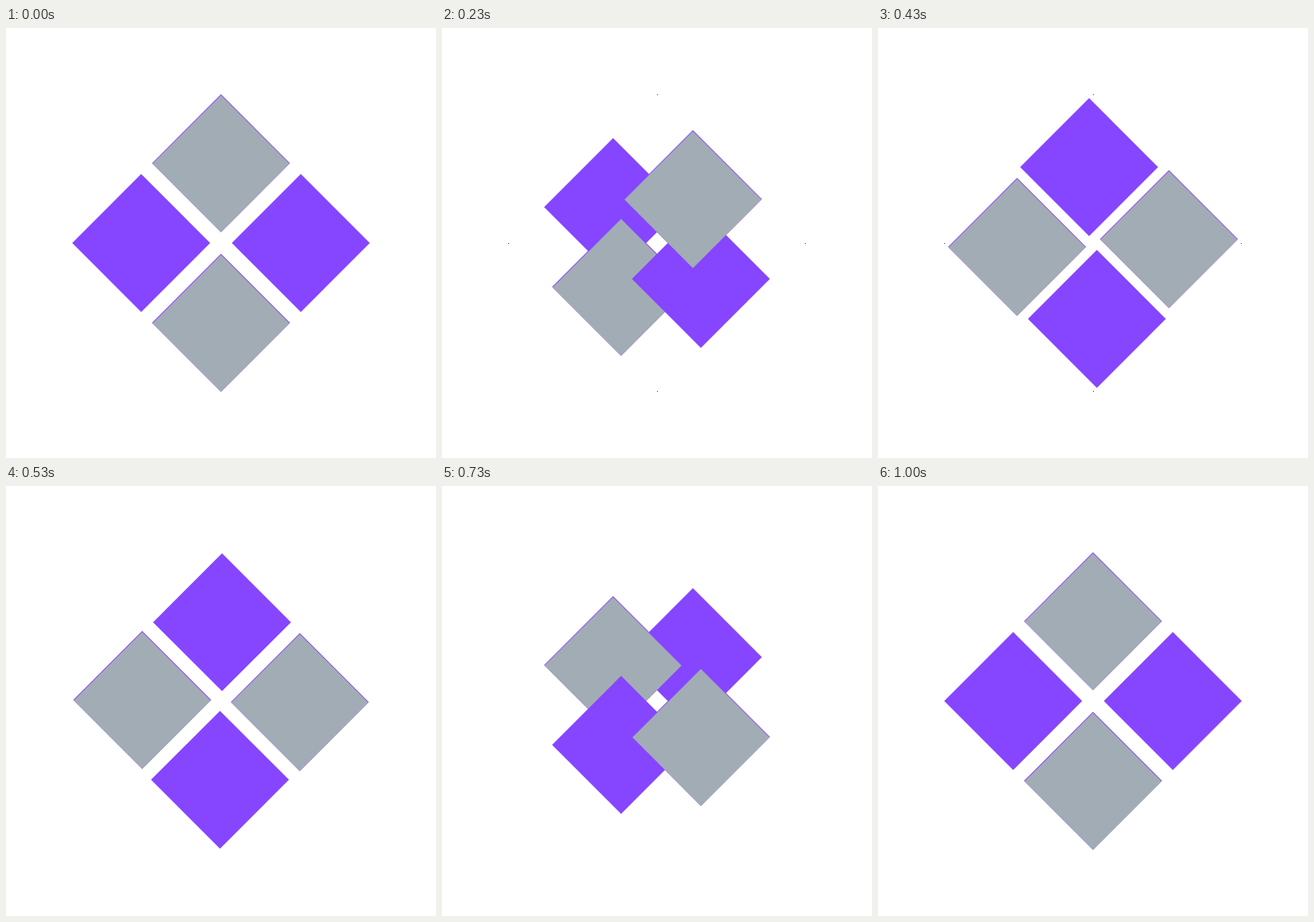
An HTML page with a canvas that plays this animation: 500 px wide and 500 px high, repeating every 1.03 s.

```html
<!DOCTYPE html>
<html lang="en">
<head>
<meta charset="utf-8">
<title>Sliding squares</title>
<style>
  html, body { margin: 0; width: 100%; height: 100%; overflow: hidden; background: #fff; }
  canvas { display: block; width: 500px; height: 500px; }
</style>
</head>
<body>
<canvas id="stage" width="500" height="500"></canvas>
<script>
const ctx = document.getElementById('stage').getContext('2d');
const LOOP = 1030, STEPS = 31, HALF = 15;
const MID = 250, REACH = 92.8, RADIUS = 80.2;
const PURPLE = '#8645ff', GRAY = '#a2acb5', DOT = '#555060';

// Stops in clockwise order: top, right, bottom, left
const stops = [[0, -1], [1, 0], [0, 1], [-1, 0]];

const ease = x => x * x * (3 - 2 * x);
const stepStart = i => Math.round(i * 10 / 3) * 10;

function stepAt(ms) {
  let i = STEPS - 1;
  while (i > 0 && stepStart(i) > ms) i--;
  return i;
}

function diamond(x, y, r, color) {
  ctx.fillStyle = color;
  ctx.beginPath();
  for (const [dx, dy] of stops) ctx.lineTo(x + dx * r, y + dy * r);
  ctx.fill();
}

function square(index, turn, k) {
  const [ax, ay] = stops[(index + turn) % 4];
  const [bx, by] = stops[(index + turn + 1) % 4];
  const x = MID + REACH * (ax + (bx - ax) * k);
  const y = MID + REACH * (ay + (by - ay) * k);
  diamond(x, y, RADIUS, PURPLE);
  // Gray squares keep a thin purple rim along the upper edges
  if (index % 2 === 0) diamond(x, y + 0.6, RADIUS - 0.6, GRAY);
}

function draw(ms) {
  const step = stepAt(ms);
  const turn = Math.floor(step / HALF);
  const k = ease(step % HALF / HALF);
  ctx.fillStyle = '#fff';
  ctx.fillRect(0, 0, 500, 500);
  if (turn === 0 && step > 0) {
    ctx.fillStyle = DOT;
    for (const [dx, dy] of stops) {
      ctx.fillRect(Math.floor(MID + dx * 172.5), Math.floor(MID + dy * 172.5), 1, 1);
    }
  }
  for (let i = 3; i >= 0; i--) square(i, turn, k);
}

function tick() {
  draw(performance.now() % LOOP);
  requestAnimationFrame(tick);
}
draw(0);
requestAnimationFrame(tick);
</script>
</body>
</html>
```
